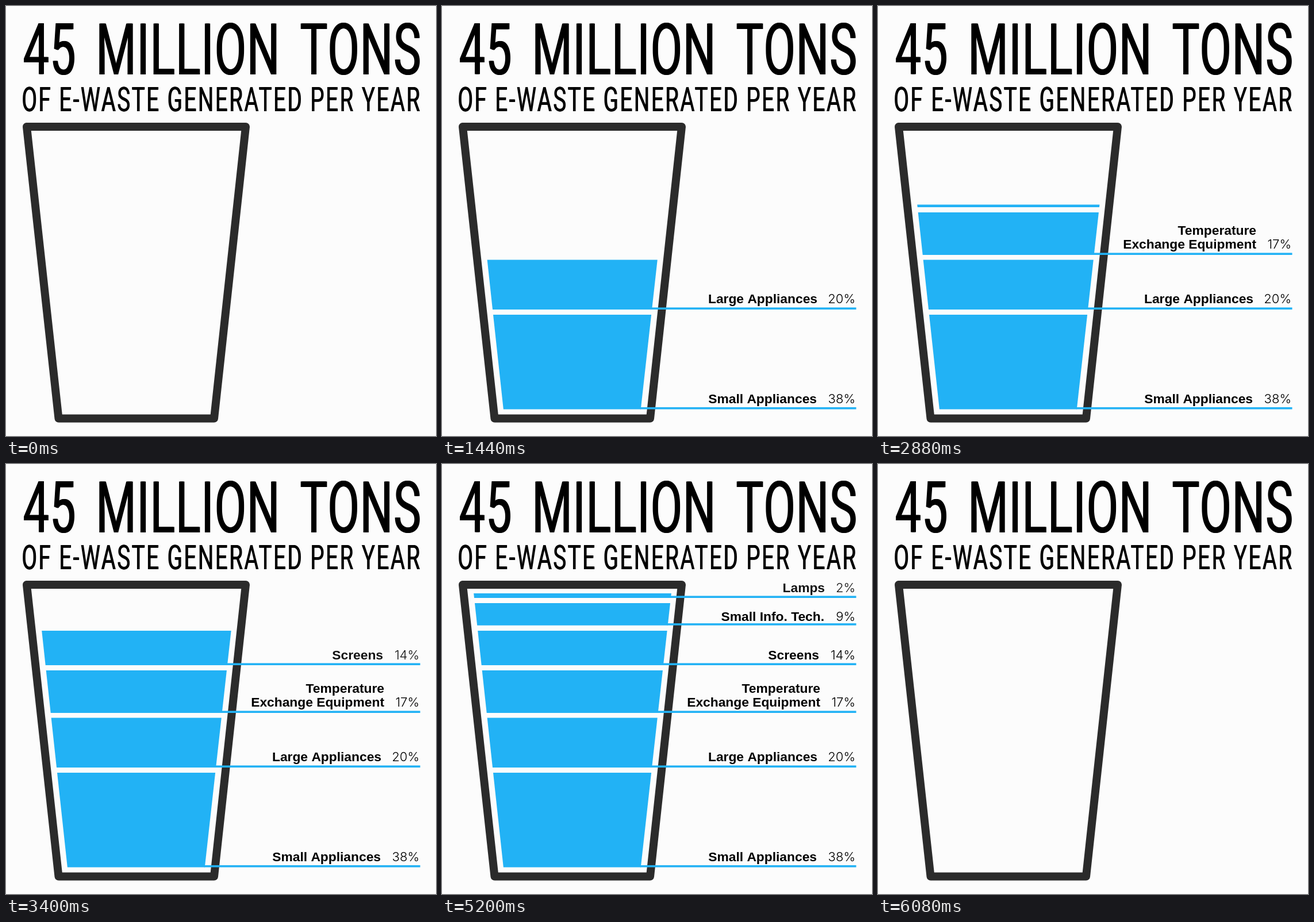
Animation, 748 px wide and 748 px high, one loop 6360 ms. Source, as an HTML page with a canvas:

```html
<!DOCTYPE html>
<html lang="en">
<head>
<meta charset="utf-8">
<title>45 million tons of e-waste</title>
<style>
  html, body { margin: 0; height: 100%; overflow: hidden; background: #fcfcfc; }
  canvas { display: block; width: 748px; height: 748px; }
</style>
</head>
<body>
<canvas id="stage" width="748" height="748"></canvas>
<script>
const ctx = document.getElementById('stage').getContext('2d');
const LOOP = 6360, FRAME = 40, BLUE = '#22b2f5';

// start time, top, bottom, right end of label, label baseline, percent, label lines
const layers = [
  { start: 0, rate: 1.5, top: 537, bottom: 701.5, x: 652, y: 691, percent: 38, label: ['Small Appliances'] },
  { start: 760, top: 441.5, bottom: 528, x: 653, y: 517, percent: 20, label: ['Large Appliances'] },
  { start: 1840, top: 359, bottom: 433, x: 658, y: 422, percent: 17, label: ['Temperature', 'Exchange Equipment'] },
  { start: 2840, top: 290, bottom: 350, x: 656, y: 340, percent: 14, label: ['Screens'] },
  { start: 3720, top: 242, bottom: 280.7, x: 665, y: 272.5, percent: 9, label: ['Small Info. Tech.'] },
  { start: 4640, top: 225, bottom: 233, x: 666, y: 223, percent: 2, label: ['Lamps'] }
];

const leftEdge = y => 57 + (y - 242) * 0.1085;
const rightEdge = y => 397 - (y - 242) * 0.1115;

function ease(time, start, length) {
  const p = Math.min(1, Math.max(0, (time - start) / length));
  return p * p * (3 - 2 * p);
}

function polygon(points) {
  ctx.beginPath();
  points.forEach(([x, y]) => ctx.lineTo(x, y));
  ctx.closePath();
}

// Condensed heading, letter-spaced to sit flush between both margins
function heading(text, size, left, right, baseline, wordGap) {
  const narrow = 0.64, bold = size * 0.014 / narrow;
  ctx.save();
  ctx.scale(narrow, 1);
  ctx.font = `400 ${size}px Roboto, Arial, sans-serif`;
  ctx.wordSpacing = wordGap + 'px';
  ctx.textAlign = 'left';
  ctx.fillStyle = '#000';
  const box = ctx.measureText(text);
  const ink = box.actualBoundingBoxLeft + box.actualBoundingBoxRight + bold;
  ctx.letterSpacing = ((right - left) / narrow - ink) / (text.length - 1) + 'px';
  const x = left / narrow + box.actualBoundingBoxLeft;
  ctx.fillText(text, x, baseline);
  ctx.fillText(text, x + bold, baseline);
  ctx.restore();
}

function glass() {
  polygon([[36, 210], [417, 210], [362, 717.5], [91.5, 717.5]]);
  ctx.lineWidth = 14;
  ctx.lineJoin = 'round';
  ctx.strokeStyle = '#2b2b2b';
  ctx.stroke();
}

function drawLayer({ start, rate = 1, top, bottom, x, y, percent, label }, time) {
  const elapsed = FRAME + (time - start - FRAME) * rate;
  const age = Math.floor(elapsed / FRAME + 1e-6) * FRAME;
  if (age <= 0) return;

  const level = bottom + (top - bottom) * ease(age, 0, 240);
  ctx.fillStyle = BLUE;
  polygon([
    [leftEdge(level), level], [rightEdge(level), level],
    [rightEdge(bottom), bottom], [leftEdge(bottom), bottom]
  ]);
  ctx.fill();

  const from = rightEdge(bottom) - 1;
  ctx.fillRect(from, bottom - 3.6, (720.5 - from) * ease(age, 200, 225), 3.6);

  ctx.globalAlpha = ease(age, 360, 240);
  ctx.fillStyle = '#000';
  ctx.textAlign = 'right';
  ctx.font = 'bold 22.8px "Liberation Sans", Arial, sans-serif';
  label.forEach((line, i) => ctx.fillText(line, x, y - 24 * (label.length - 1 - i)));
  ctx.font = '300 22px Inter, sans-serif';
  ctx.fillText(percent + '%', 719, y);
  ctx.globalAlpha = 1;
}

function draw(now) {
  const time = now % LOOP;
  ctx.fillStyle = '#fcfcfc';
  ctx.fillRect(0, 0, 748, 748);
  heading('45 MILLION TONS', 125, 31, 720, 118.7, 20);
  heading('OF E-WASTE GENERATED PER YEAR', 60, 29, 720, 182.7, 0);
  glass();

  // Everything drains away from the top down
  const step = Math.floor(time / FRAME) * FRAME;
  const edge = step > 5200 ? 207 + 505 * ease(step, 5200, 920) : 0;
  if (step < 6080) {
    ctx.save();
    ctx.beginPath();
    ctx.rect(0, edge, 748, 748);
    ctx.clip();
    layers.forEach(layer => drawLayer(layer, time));
    ctx.restore();
  }
}

const origin = performance.now();
function tick() {
  draw(performance.now() - origin);
  requestAnimationFrame(tick);
}
tick();
</script>
</body>
</html>
```
